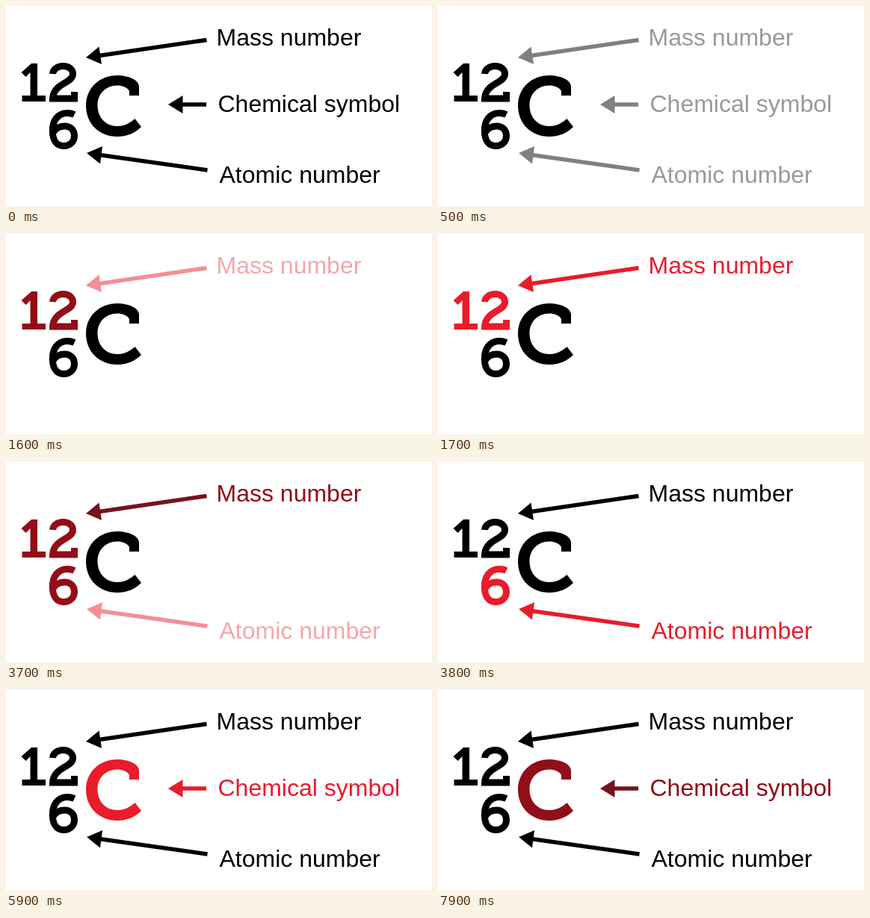
These frames come from a looping animation (570x268 px, 8000 ms). An HTML page:

```html
<!DOCTYPE html>
<html lang="en">
<head>
<meta charset="utf-8">
<title>Nuclide notation</title>
<style>
  html, body { margin: 0; width: 100%; height: 100%; overflow: hidden; background: #fff; }
  svg { display: block; width: 570px; height: 268px; }
  text { font: 32px "Liberation Sans", Arial, sans-serif; }
  .stroke { fill: none; stroke: currentColor; stroke-width: 9; }
  .arrow line { stroke: currentColor; stroke-width: 5.5; }
  .arrow polygon, .solid, text { fill: currentColor; }
</style>
</head>
<body>
<svg viewBox="0 0 570 268">
  <g id="mass">
    <g class="glyph">
      <path class="solid" d="M34 77H42V120H53V128H21.5V120H32.5V89L26.5 95L20.5 89Z"/>
      <path class="stroke" d="M62.5 91C63 84.500 69 80.500 76.500 80.500C84 80.500 89.500 85 89.500 91C89.500 104 63.500 103 62.500 124H91.500V115"/>
    </g>
    <g class="arrow">
      <line x1="268.500" y1="45.500" x2="125" y2="66.500"/>
      <polygon points="107,69 124.500,54.500 128,78"/>
    </g>
    <text x="281.500" y="53">Mass number</text>
  </g>
  <g id="atomic">
    <g class="glyph">
      <path class="stroke" d="M91.500 145.500C88 143.800 85 143.500 82 143.500C69 143.500 62.300 154 62.300 167C62.300 180 68 187.500 77 187.500C85.500 187.500 91.500 182 91.500 174C91.500 166 86 161 78.500 161C71 161 65 165 62.500 171"/>
    </g>
    <g class="arrow">
      <line x1="269.500" y1="220" x2="125" y2="199.500"/>
      <polygon points="108,197 129,188 126,211.500"/>
    </g>
    <text x="285.500" y="237">Atomic number</text>
  </g>
  <g id="symbol">
    <g class="glyph">
      <path class="solid" d="M178 120H165V114C162 108.500 155 106.500 149 106.500C133 106.500 122.500 118 122.500 133C122.500 149 133 161 149 161C159 161 167 156 172.500 151L181 162C174 169 163 175 149 175C124 175 107 157 107 133.500C107 110 125 93 149 93C161 93 178 98 178 108Z"/>
    </g>
    <g class="arrow">
      <line x1="268" y1="132" x2="235" y2="132"/>
      <polygon points="217,132 236.500,120 236.500,144"/>
    </g>
    <text x="283.500" y="142">Chemical symbol</text>
  </g>
</svg>
<script>
  const LOOP = 8000;

  // Each look lists the colours of glyph, arrow and label.
  const looks = {
    black: ["#000", "#000", "#000"],
    hidden: ["#000", "none", "none"],
    fading: ["#000", "#808080", "#999"],
    red: ["#e81c2a", "#e81c2a", "#e81c2a"],
    dark: ["#920e18", "#74131c", "#8f0d18"],
    appearing: ["#920e18", "#f48f94", "#f4a7aa"]
  };

  // Start time, then the looks of mass, atomic and symbol.
  const steps = [
    [0, "black", "black", "black"],
    [500, "fading", "fading", "fading"],
    [600, "hidden", "hidden", "hidden"],
    [1600, "appearing", "hidden", "hidden"],
    [1700, "red", "hidden", "hidden"],
    [3700, "dark", "appearing", "hidden"],
    [3800, "black", "red", "hidden"],
    [5800, "black", "dark", "appearing"],
    [5900, "black", "black", "red"],
    [7900, "black", "black", "dark"]
  ];

  const groups = ["mass", "atomic", "symbol"].map(id => {
    const group = document.getElementById(id);
    return [".glyph", ".arrow", "text"].map(part => group.querySelector(part));
  });

  function paint(element, color) {
    const hidden = color === "none";
    element.style.visibility = hidden ? "hidden" : "visible";
    if (!hidden) element.style.color = color;
  }

  function render(time) {
    const [, ...names] = steps.findLast(([start]) => start <= time);
    groups.forEach((parts, i) =>
      parts.forEach((part, j) => paint(part, looks[names[i]][j])));
  }

  const begin = performance.now();
  function tick() {
    render((performance.now() - begin) % LOOP);
    requestAnimationFrame(tick);
  }
  tick();
</script>
</body>
</html>
```
